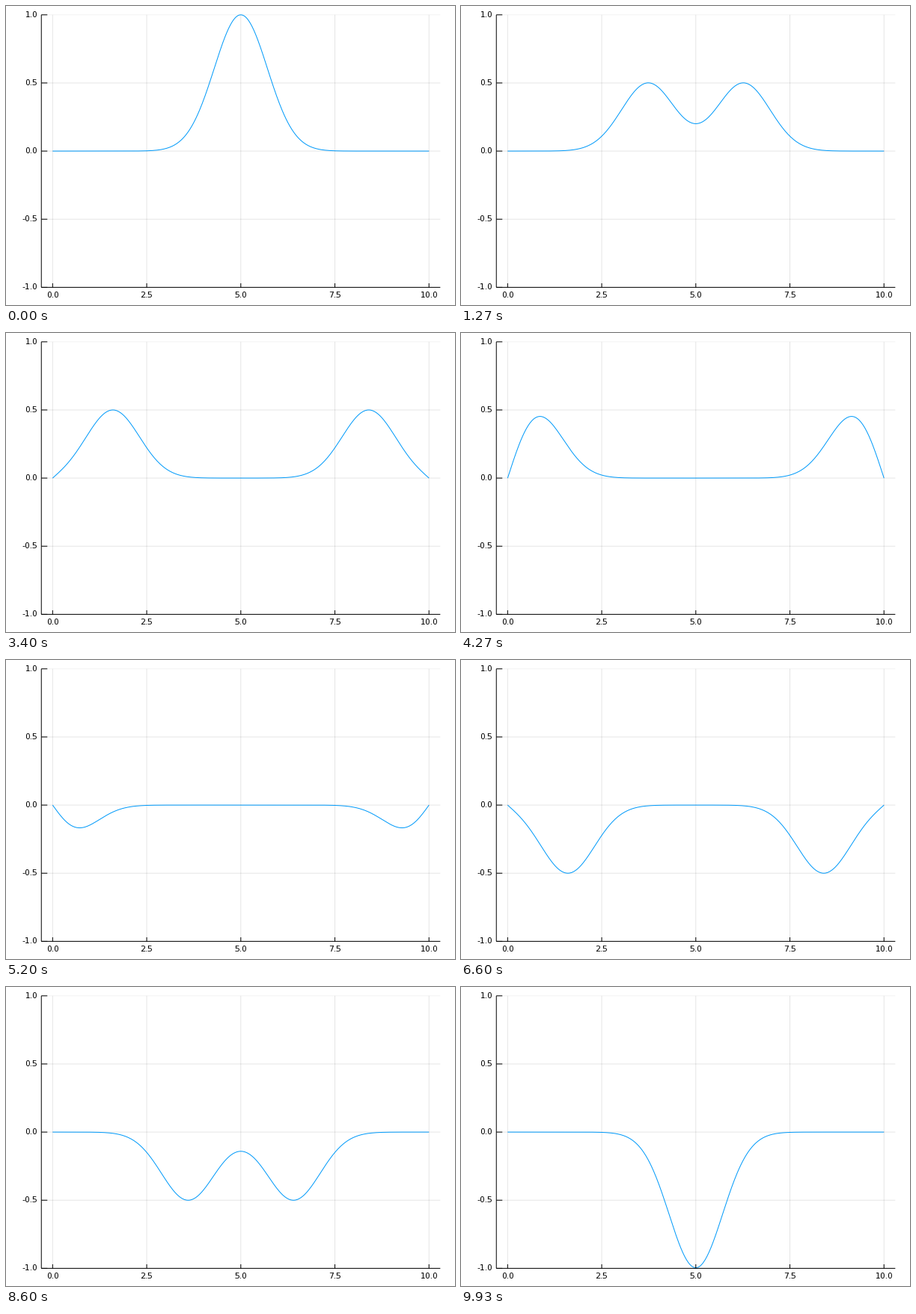
A matplotlib script for the animation above (9.99 s loop, 600 px wide and 400 px high).

```python
import numpy as np
import matplotlib.pyplot as plt
from matplotlib.animation import FuncAnimation

W, H, DPI = 600, 400, 100
FRAMES, FPS = 150, 15
LENGTH = 10.0
MM = DPI / 25.4  # one millimetre in pixels
LEFT, RIGHT, TOP, BOTTOM = 12 * MM, W - 5 * MM, 3 * MM, H - 6 * MM
TICK = 0.015  # tick length as a share of the plot area
PX = 72 / DPI  # one pixel in points

plt.rcParams.update({"font.family": "DejaVu Sans", "text.hinting_factor": 1})


def sx(x):
    return LEFT + (x + 0.3) * (RIGHT - LEFT) / 10.6


def sy(y):
    return (TOP + BOTTOM) / 2 - y * (BOTTOM - TOP) / 2


def pulse(x):
    """Gaussian bump, extended oddly about both fixed ends."""
    x = np.mod(x, 2 * LENGTH)
    return np.exp(-(x - 5) ** 2) - np.exp(-(x - 15) ** 2)


def wave(x, t):
    return (pulse(x - t) + pulse(x + t)) / 2


fig = plt.figure(figsize=(W / DPI, H / DPI), dpi=DPI, facecolor="white")
ax = fig.add_axes([0, 0, 1, 1])
ax.set_xlim(0, W)
ax.set_ylim(H, 0)
ax.axis("off")


def line(xs, ys, color="black", alpha=1, z=3):
    return ax.plot(xs, ys, color=color, alpha=alpha, lw=PX, snap=False,
                   zorder=z, solid_capstyle="butt")[0]


def label(x, y, text, align):
    ax.text(x, y, text, size=11 * PX, ha=align, va="baseline")


for v in (0, 2.5, 5, 7.5, 10):
    x = sx(v)
    line([x, x], [TOP, BOTTOM], alpha=0.1, z=1)
    line([x, x], [BOTTOM - TICK * (BOTTOM - TOP), BOTTOM])
    label(x, 390, f"{v:.1f}", "center")

for v in (-1, -0.5, 0, 0.5, 1):
    y = sy(v)
    # the top grid line is half cut off by the plot area
    line([LEFT, RIGHT], [y, y], alpha=0.05 if v == 1 else 0.1, z=1)
    line([LEFT, LEFT + TICK * (RIGHT - LEFT)], [y, y])
    label(42, y + 3, f"{v:.1f}", "right")

line([LEFT, LEFT], [TOP, BOTTOM])
line([LEFT, RIGHT], [BOTTOM, BOTTOM])

xs = np.linspace(0, LENGTH, 401)
curve = line(sx(xs), sy(wave(xs, 0)), color="#009afa", z=2)


def update(i):
    curve.set_ydata(sy(wave(xs, i / FPS)))
    return [curve]


anim = FuncAnimation(fig, update, frames=FRAMES, interval=66.6,
                     repeat=True, repeat_delay=0, blit=False)
plt.show()
```
